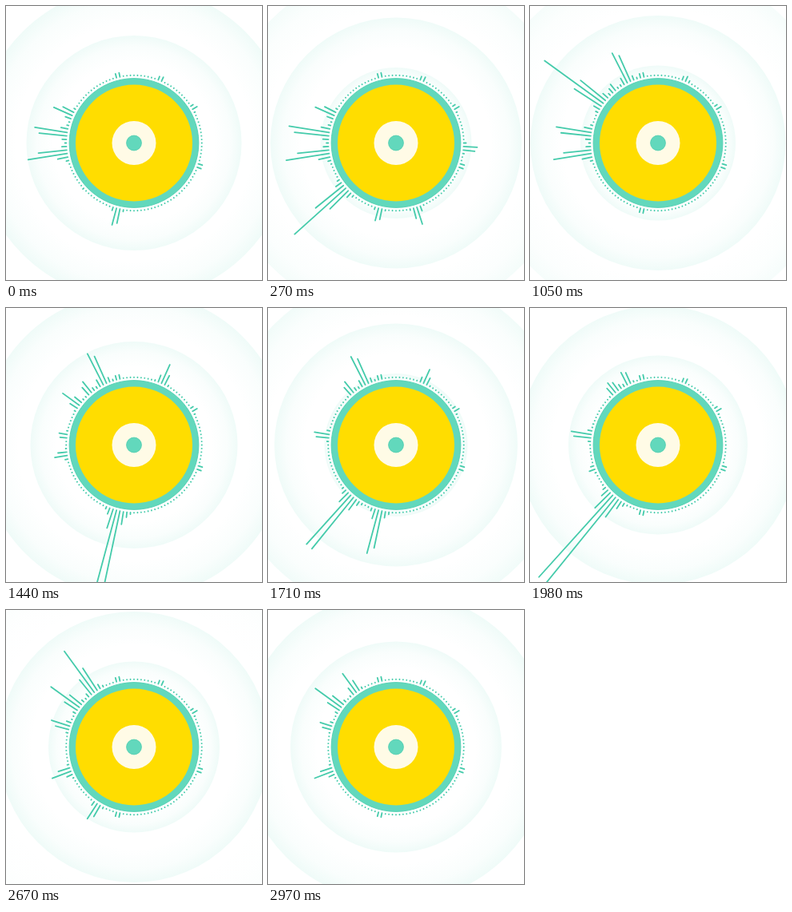
Recreate the animation shown at these times as an HTML page. Size 320 by 343 pixels, loop 3 s.

```html
<!DOCTYPE html>
<html lang="en">
<head>
<meta charset="utf-8">
<title>Sound pulse</title>
<style>
  html, body { margin: 0; width: 100%; height: 100%; overflow: hidden; background: #fff; }
  svg { display: block; width: 100%; height: 100%; }
</style>
</head>
<body>
<svg viewBox="0 0 320 343">
  <defs>
    <radialGradient id="glow">
      <stop offset=".75" stop-color="#62d8bc" stop-opacity="0"/>
      <stop offset=".9" stop-color="#62d8bc" stop-opacity=".035"/>
      <stop offset="1" stop-color="#62d8bc" stop-opacity=".1"/>
    </radialGradient>
  </defs>
  <g transform="translate(160 171.5)">
    <g id="ripples" fill="url(#glow)"></g>
    <path id="bars" fill="none" stroke="#45cbab" stroke-width="1.8" stroke-linecap="round"/>
    <g fill="#62d8bc" stroke="#52cfb1" stroke-width=".9">
      <circle r="80.9"/>
      <circle r="73" fill="#fd0" stroke="none"/>
      <circle r="27.5" fill="#fffbe6" stroke="none"/>
      <circle r="9.4"/>
    </g>
  </g>
</svg>
<script>
const LOOP = 3000, STEP = 30, BEAT = 750;
const BARS = 120, RADIUS = 84;

// A note swells around one bar position, peaks at a time and fades again
const note = (bar, height, at, hold = 370) => ({ bar, height, at, hold });
const notes = [
  note(34.6, 26, 0),
  note(68.2, 28, 200, 500),
  note(57.3, 60, 500, 900),
  note(46.1, 105, 510),
  note(24.2, 29, 510),
  note(1.4, 25, 510),
  note(62.6, 60, 550, 800),
  note(72, 92, 1050),
  note(81.4, 51, 1350, 650),
  note(34.6, 125, 1440, 300),
  note(98.1, 27, 1440),
  note(76.7, 20, 1600, 650),
  note(43.5, 170, 1980, 320),
  note(62.6, 30, 1980),
  note(40.7, 34, 2400),
  note(78.1, 66, 2520, 480),
  note(65.7, 27, 2580, 480),
  note(72, 45, 2700, 500),
  note(53.2, 27, 2700, 700)
];

// Quiet bands that never fall silent
const hum = [6.5, 34.5, 85.5, 97.6, 109.8].map(bar => ({ bar, level: 8 }));

const swell = ({ bar, height, at, hold }, time) =>
  ({ bar, level: height * Math.exp(-(((time - at) / hold) ** 4)) });

function spread(bar, peak) {
  const gap = Math.abs(bar - peak.bar);
  const d = Math.min(gap, BARS - gap);
  return peak.level * Math.max(Math.exp(-0.8 * d * d), 0.5 * Math.exp(-0.8 * d));
}

function barPath(bar, height) {
  const angle = bar * 2 * Math.PI / BARS;
  const point = r => `${(r * Math.cos(angle)).toFixed(2)} ${(r * Math.sin(angle)).toFixed(2)}`;
  return `M${point(RADIUS + 0.6)}L${point(RADIUS + Math.max(0.9, height - 0.8))}`;
}

const ripples = Array.from({ length: 3 }, () => {
  const circle = document.createElementNS("http://www.w3.org/2000/svg", "circle");
  return document.getElementById("ripples").appendChild(circle);
});
const bars = document.getElementById("bars");

function draw(time) {
  ripples.forEach((circle, i) => {
    const age = time % BEAT + i * BEAT;
    circle.setAttribute("r", 72 + age / 12);
    circle.setAttribute("opacity", Math.min(1, Math.max(0, (1980 - age) / 300)));
  });

  const peaks = hum.concat(notes.map(n => swell(n, time)));
  let path = "";
  for (let bar = 0; bar < BARS; bar++) {
    path += barPath(bar, Math.max(...peaks.map(peak => spread(bar, peak))));
  }
  bars.setAttribute("d", path);
}

const start = performance.now();
function tick() {
  const time = (performance.now() - start) % LOOP;
  draw(Math.floor(time / STEP) * STEP);
  requestAnimationFrame(tick);
}
tick();
</script>
</body>
</html>
```
